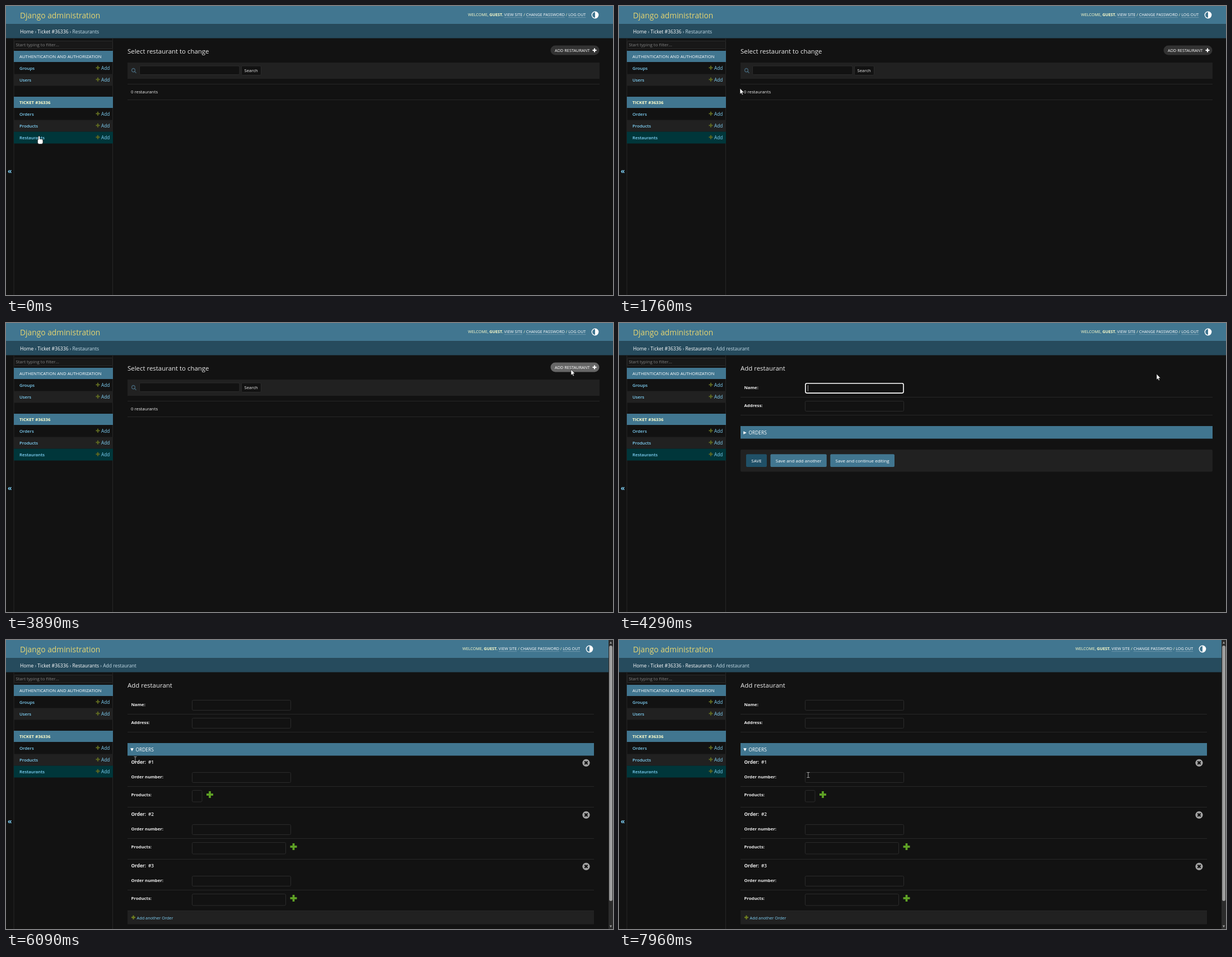
Write an HTML page with a canvas that moves like this. It is 1084x516 px and loops after 8000 ms.

```html
<!DOCTYPE html>
<html lang="en">
<head>
<meta charset="utf-8">
<title>Add restaurant</title>
<style>
html, body { margin: 0; overflow: hidden; background: #121212; }
canvas { display: block; width: 1084px; height: 516px; }
</style>
</head>
<body>
<canvas id="stage" width="1084" height="516"></canvas>
<script>
const ctx = document.getElementById('stage').getContext('2d');
const LOOP = 8000, PRESS_AT = 3890, FORM_AT = 4090, BLUR_AT = 5360, OPEN_AT = 5560;
const BG = '#121212', DARK = '#212121', LINE = '#272727', BORDER = '#2b2b2b', BLUE = '#417690',
  NAVY = '#264b5d', LINK = '#81d4fa', FG = '#eeeeee', GREEN = '#5fa225', OLIVE = '#5c6620',
  CREAM = '#ffffcc', SOFT = '#c4dce8', WHITE = '#ffffff';

// Pointer stops, and small circles drawn on the way
const stops = [
  { end: 270, dur: 210, x: 118, y: 220 },
  { end: 1130, dur: 570, x: 384, y: 116 },
  { end: 1763, dur: 620, x: 217, y: 147 },
  { end: 2500, dur: 700, x: 254, y: 175 },
  { end: 3097, dur: 430, x: 1025, y: 66 },
  { end: 3430, dur: 330, x: 1009, y: 83 },
  { end: 4297, dur: 207, x: 960, y: 91 },
  { end: 4890, dur: 593, x: 470, y: 186 },
  { end: 5430, dur: 540, x: 224, y: 195 },
  { end: 6097, dur: 40, x: 231, y: 213 },
  { end: 6560, dur: 460, x: 344, y: 280 },
  { end: 7960, dur: 260, x: 338, y: 241 }
];
const orbits = [{ from: 1763, to: 2500, r: 24 }, { from: 6500, to: 7700, r: 25 }];

function pointer(t) {
  let x = 59, y = 232;
  for (const s of stops) {
    const k = Math.min(1, Math.max(0, 1 - (s.end - t) / s.dur));
    const ease = (k + k * k * (3 - 2 * k)) / 2;
    x += (s.x - x) * ease;
    y += (s.y - y) * ease;
  }
  for (const { from, to, r } of orbits) {
    const k = (t - from) / (to - from);
    if (k <= 0 || k >= 1) continue;
    const reach = r * Math.sqrt(Math.sin(Math.PI * k)), angle = Math.PI * (1 - 4 * k);
    x += reach * Math.cos(angle);
    y += reach * Math.sin(angle);
  }
  return [x, y];
}

function rect(x, y, w, h, fill, radius = 0, stroke, lineWidth = 1) {
  ctx.beginPath();
  ctx.roundRect(x, y, w, h, radius);
  if (fill) { ctx.fillStyle = fill; ctx.fill(); }
  if (stroke) { ctx.strokeStyle = stroke; ctx.lineWidth = lineWidth; ctx.stroke(); }
}

// Draws vertically centred text and returns its right end
function text(str, x, y, size, color = FG, weight = 400) {
  ctx.font = `${weight} ${size}px "Open Sans", "Noto Sans", sans-serif`;
  ctx.fillStyle = color;
  ctx.fillText(str, x, y + size * 0.35);
  return x + ctx.measureText(str).width;
}

function disc(x, y, r, color, from = 0, to = 2 * Math.PI) {
  ctx.beginPath();
  ctx.arc(x, y, r, from, to);
  ctx.fillStyle = color;
  ctx.fill();
}

function triangle(x, y, r, angle, color) {
  ctx.save();
  ctx.translate(x, y);
  ctx.rotate(angle);
  ctx.beginPath();
  ctx.moveTo(r, 0);
  ctx.lineTo(-r, r);
  ctx.lineTo(-r, -r);
  ctx.fillStyle = color;
  ctx.fill();
  ctx.restore();
}

function plus(x, y, size, color) {
  const bar = size * 0.31;
  rect(x - size / 2, y - bar / 2, size, bar, color);
  rect(x - bar / 2, y - size / 2, bar, size, color);
}

const field = (x, y, w, h) => rect(x + 0.5, y + 0.5, w - 1, h - 1, BG, 2, BORDER);
const rule = (y, right) => rect(217, y, right - 217, 1, LINE);
const label = (str, y) => text(str, 223.5, y, 7.75, FG, 700);
const heading = str => text(str, 217, 80.5, 11.45);

function header(width, form) {
  rect(0, 0, width, 32.5, BLUE);
  rect(0, 32.5, width, 25, NAVY);
  text('Django administration', 25, 17.5, 13.8, '#e6d571');

  const shift = width - 1084 && -10;
  let x = text('WELCOME, ', 825 + shift, 15.5, 7.2, CREAM);
  x = text('GUEST. ', x, 15.5, 7.2, CREAM, 700);
  ['VIEW SITE', 'CHANGE PASSWORD', 'LOG OUT'].forEach((str, i) => {
    if (i) x = text(' / ', x, 15.5, 7.2, CREAM);
    const end = text(str, x, 15.5, 7.2, WHITE);
    rect(x, 20, end - x, 0.6, 'rgba(255,255,255,.4)');
    x = end;
  });
  disc(1052 + shift, 16, 6.4, WHITE);
  disc(1052 + shift, 16, 5, BLUE, Math.PI / 2, Math.PI * 1.5);

  const crumbs = ['Home', 'Ticket #36336', 'Restaurants'];
  if (form) crumbs.push('Add restaurant');
  x = 25;
  crumbs.forEach((str, i) => {
    if (i) x = text(' › ', x, 45.8, 8.55, SOFT);
    x = text(str, x, 45.8, 8.55, i < crumbs.length - 1 ? WHITE : SOFT);
  });
}

function section(y, title, color, weight, items) {
  rect(14, y, 177, 20, BLUE);
  text(title, 24, y + 10.3, 7.8, color, weight);
  items.forEach((str, i) => {
    const top = y + 20.5 + i * 21;
    if (i) rect(14, top, 177, 21, i > 1 ? '#00363a' : DARK);
    text(str, 24, top + 10.5, 7.75, LINK, 600);
    plus(164, top + 9.7, 7, OLIVE);
    text('Add', 170, top + 10.5, 8.2, LINK);
  });
}

function sidebar(open) {
  rect(13.5, 57.5, 1, 459, LINE);
  rect(190, 57.5, 1, 459, LINE);
  text('«', 3, open ? 323.5 : 294.5, 12, LINK, 700);
  rect(14.5, 62.5, 176, 14, '#181818', 1, BORDER);
  text('Start typing to filter...', 17.5, 69.7, 7.9, '#808080');
  section(80, 'AUTHENTICATION AND AUTHORIZATION', WHITE, 400, ['Groups', 'Users']);
  section(162, 'TICKET #36336', CREAM, 700, ['Orders', 'Products', 'Restaurants']);
}

function listPage(hover) {
  heading('Select restaurant to change');
  rect(972.5, 70.5, 87, 17, hover ? '#666' : '#333', 8.5);
  text('ADD RESTAURANT', 980, 79, 7.35, WHITE);
  plus(1051, 79, 7, WHITE);

  rect(217, 101, 843, 29, DARK);
  ctx.beginPath();
  ctx.arc(227.5, 114.7, 3, Math.PI / 4, Math.PI * 2.25);
  ctx.lineTo(232.5, 119.7);
  ctx.strokeStyle = '#446476';
  ctx.lineWidth = 1.3;
  ctx.stroke();
  field(238, 106.5, 179.5, 16.5);
  field(420, 106.5, 36, 17.5);
  text('Search', 425.5, 115.7, 7.75);
  rule(139, 1060);
  text('0 restaurants', 223, 153.7, 7.8);
  rule(167, 1060);
}

function formPage(right, open, focused) {
  heading('Add restaurant');
  ['Name:', 'Address:'].forEach((str, i) => {
    label(str, 115.7 + i * 32);
    field(332, 107 + i * 32, 177, 19);
    rule(132 + i * 32, right);
  });
  if (focused) {
    rect(333, 107.7, 175, 17.4, BG, 2.5, WHITE, 1.6);
    rect(337, 111, 0.8, 11, '#ccc');
  }

  rect(217, 184, right - 217, 22.5, BLUE);
  triangle(225, 196, 2.8, open ? Math.PI / 2 : 0, WHITE);
  text('ORDERS', 231.5, 196, 8.4, WHITE);
  if (open) return orders(right);

  rect(217, 226, right - 217, 39.5, DARK, 2);
  let x = 227;
  ['SAVE', 'Save and add another', 'Save and continue editing'].forEach((str, i) => {
    ctx.font = '400 8px "Open Sans", "Noto Sans", sans-serif';
    const w = ctx.measureText(str).width + 18.6;
    rect(x, 234.3, w, 22.7, i ? BLUE : '#205067', 2);
    text(str, x + 9.3, 246, 8, WHITE);
    x += w + 6.5;
  });
}

function orders(right) {
  for (let i = 0; i < 3; i++) {
    const y = Math.round(i * 92.6), w = i ? 168 : 18.5;
    text('Order:', 223.5, 218 + y, 8.3, FG, 700);
    text('#' + (i + 1), 254, 218 + y, 8.3, FG, 600);
    disc(1036, 219.3 + y, 6.6, '#a3a3a3');
    ctx.save();
    ctx.translate(1036, 219.3 + y);
    ctx.rotate(Math.PI / 4);
    plus(0, 0, 7.5, BG);
    ctx.restore();
    label('Order number:', 244.7 + y);
    field(332, 236 + y, 177, 19);
    rule(261 + y, right);
    label('Products:', 276.7 + y);
    field(332, 268 + y, w, 21.5);
    plus(345.5 + w, 276 + y, 12, GREEN);
    rule(298 + y, right);
  }
  rect(217, 484, right - 217, 23.5, DARK);
  plus(227.5, 495.3, 7, '#70801f');
  text('Add another Order', 233.5, 496, 7.35, LINK);
}

function scrollbar() {
  rect(1076, 0, 8, 516, '#2c2c2c');
  rect(1077.2, 10, 5.8, 456, '#9f9f9f', 3);
  triangle(1080, 4.5, 2, -Math.PI / 2, '#9f9f9f');
  triangle(1080, 511.5, 2, Math.PI / 2, '#9f9f9f');
}

const onButton = (x, y) => x > 972 && x < 1060 && y > 71 && y < 88;

function cursorKind(t, x, y) {
  if (t < FORM_AT) {
    const onLink = x < 70 || (t < PRESS_AT && onButton(x, y));
    return onLink ? 'hand' : 'arrow';
  }
  if (x > 217 && y >= 184 && y <= 207) return 'hand';
  if (t < OPEN_AT) return 'arrow';
  if (Math.hypot(x - 364, y - 276) < 8) return 'hand';
  const onText = x < 266 && y < 224, onField = x > 332 && y > 236 && y < 255;
  return onText || onField ? 'beam' : 'arrow';
}

function drawCursor(kind, x, y) {
  ctx.save();
  ctx.translate(x, y);
  if (kind === 'arrow') {
    ctx.beginPath();
    [[0, 0], [0, 10.2], [2.3, 8.2], [3.9, 11.8], [5.4, 11.1], [3.9, 7.6], [7, 7.4]]
      .forEach(p => ctx.lineTo(...p));
    ctx.closePath();
    ctx.fillStyle = WHITE;
    ctx.fill();
    ctx.strokeStyle = '#111';
    ctx.lineWidth = 0.6;
    ctx.stroke();
  } else if (kind === 'hand') {
    rect(-1.2, 0, 2.6, 9, WHITE, 1.3, '#111', 0.7);
    rect(-2.6, 5.5, 9.6, 9, WHITE, 3, '#111', 0.7);
    rect(-0.8, 2, 1.8, 7, WHITE);
  } else {
    rect(-0.5, -4.5, 0.9, 9, '#bbb');
    rect(-2.5, -5, 5, 0.8, '#bbb');
    rect(-2.5, 4.2, 5, 0.8, '#bbb');
  }
  ctx.restore();
}

function draw(t) {
  const form = t >= FORM_AT, open = t >= OPEN_AT;
  // The pointer takes 15 positions per second
  const step = 200 / 3;
  const [x, y] = pointer(Math.floor((t - 23) / step) * step + 30);
  rect(0, 0, 1084, 516, BG);
  header(open ? 1076 : 1084, form);
  sidebar(open);
  if (form) formPage(open ? 1050 : 1060, open, t < BLUR_AT);
  else listPage(onButton(x, y));
  if (open) scrollbar();
  drawCursor(cursorKind(t, x, y), x, y);
}

const start = performance.now();
function tick() {
  draw((performance.now() - start) % LOOP);
  requestAnimationFrame(tick);
}
tick();
</script>
</body>
</html>
```
